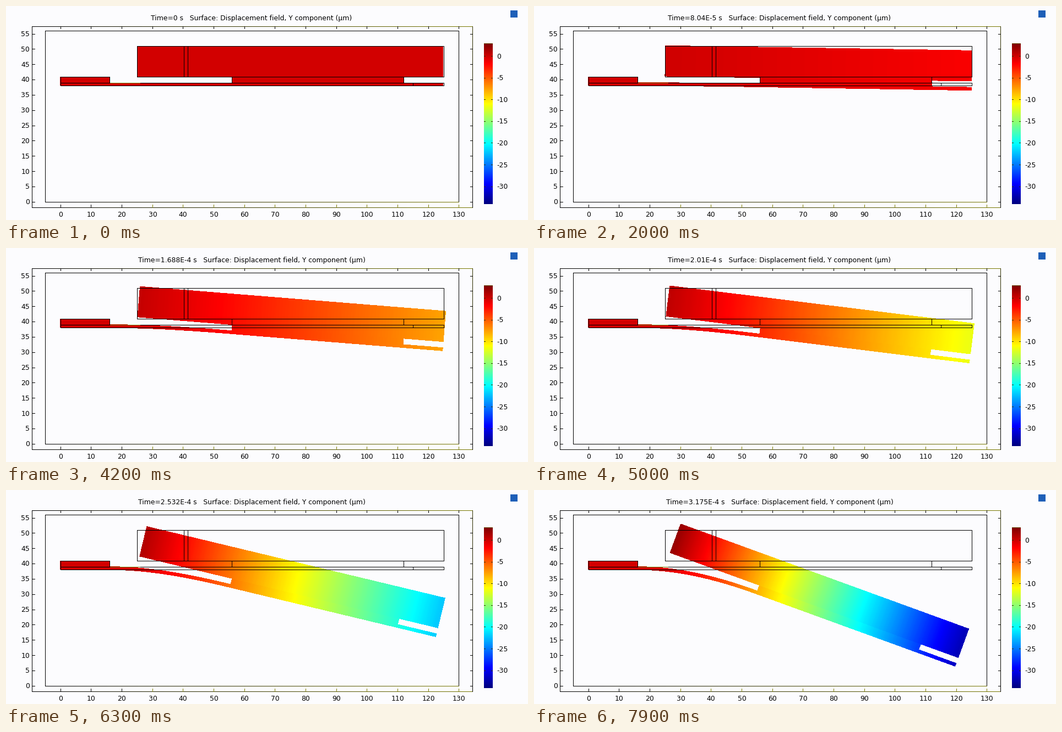
Animation of 948 by 390 pixels, one loop 8 s. Source, as a matplotlib script:

```python
import numpy as np
import matplotlib.pyplot as plt
from matplotlib.animation import FuncAnimation
from matplotlib.collections import LineCollection, PolyCollection
from matplotlib.colors import LinearSegmentedColormap, to_rgb
from matplotlib.patches import Rectangle

W, H, DPI = 948, 390, 100
FRAMES, STEP_MS = 80, 100
PX = 72 / DPI                      # one pixel in points
VMIN, VMAX = -34.0, 2.97           # colour range in µm
CLAMP, POST = 16, 56               # free span of the thin beam
SPAN = POST - CLAMP
BLACK, OLIVE = "#000000", "#7a7a00"

rainbow = LinearSegmentedColormap.from_list("rainbow", [
    (0, "#000080"), (1 / 8, "#0000ff"), (3 / 8, "#00ffff"),
    (5 / 8, "#ffff00"), (7 / 8, "#ff0000"), (1, "#800000")], N=512)

plt.rcParams["font.family"] = "DejaVu Sans"
plt.rcParams["font.size"] = 12.34 * PX

fig = plt.figure(figsize=(W / DPI, H / DPI), dpi=DPI, facecolor="#fcfcfe")
ax = fig.add_axes([0, 0, 1, 1])


def sx(x):
    return 98.5 + 5.568 * np.asarray(x, float)


def sy(y):
    return 356.9 - 5.57 * np.asarray(y, float)


def bar_y(v):
    return 91.0 - 7.917 * v


def snap(v):
    """Centre of the pixel nearest to v."""
    return np.floor(v + 0.5) + 0.5


def line(x0, y0, x1, y1, c0=BLACK, c1=None):
    """One-pixel line in stage pixels, optionally fading between two colours."""
    n = 40 if c1 else 1
    t = np.linspace(0, 1, n + 1)[:, None]
    a, b = np.array([snap(x0), snap(y0)]), np.array([snap(x1), snap(y1)])
    pts = a + (b - a) * t
    ca, cb = np.array(to_rgb(c0)), np.array(to_rgb(c1 or c0))
    ax.add_collection(LineCollection(
        np.stack([pts[:-1], pts[1:]], axis=1), colors=ca + (cb - ca) * t[:-1],
        linewidths=PX, capstyle="projecting", snap=False, zorder=5),
        autolim=False)


def edge(x0, y0, x1, y1, c0=BLACK, c1=None):
    """Line in model units."""
    line(sx(x0), sy(y0), sx(x1), sy(y1), c0, c1)


def box(x0, y0, x1, y1):
    for seg in ((x0, y0, x1, y0), (x1, y0, x1, y1),
                (x1, y1, x0, y1), (x0, y1, x0, y0)):
        edge(*seg)


# ---- static plot furniture ----
def draw_axes():
    l, t, r, b = 47, 37, 847, 367
    line(l, t, r, t, BLACK, OLIVE)
    line(l, b, r, b, BLACK, OLIVE)
    line(l, t, l, b)
    line(r, t, r, b, "#303000", BLACK)
    for v in range(0, 131, 10):
        x = sx(v)
        line(x, t, x, t + 4)
        line(x, b - 5, x, b, BLACK if v < 30 else OLIVE)
        ax.text(snap(x), 384, str(v), ha="center", va="baseline")
    for v in range(0, 56, 5):
        y = sy(v)
        line(l, y, l + 5, y)
        line(r - 4, y, r, y)
        ax.text(43, y + 4.4, str(v), ha="right", va="baseline")


def draw_bar():
    ramp = np.linspace(1, 0, 293)[:, None]
    ax.imshow(ramp, cmap=rainbow, vmin=0, vmax=1, aspect="auto",
              extent=(868, 884, 361, 68), zorder=2)
    line(868, 68, 883, 68, "#604000")
    for v in range(0, -31, -5):
        y = bar_y(v)
        line(868, y, 870, y, "#303000")
        line(881, y, 883, y, "#303000")
        ax.text(891, y + 4.7, str(v), ha="left", va="baseline")


def draw_outline():
    box(-5, 0, 130, 56)
    edge(-5, 0, 130, 0, BLACK, OLIVE)
    box(0, 38, 125, 39)
    box(0, 39, 16, 41)
    box(25, 41, 125, 51)
    for x, y0, y1 in ((40.3, 41, 51), (41.5, 41, 51),
                      (56, 39, 41), (112, 39, 41), (115, 38, 39)):
        edge(x, y0, x, y1)
    edge(16.2, 39, 26, 39, OLIVE)


# ---- deforming body ----
def strip(x0, x1, y0, y1, dx=0.5):
    """Columns of quads; each overlaps the next a little to hide seams."""
    a = np.arange(x0, x1, dx)
    b = np.minimum(a + dx + 0.25, x1)
    lo, hi = np.full_like(a, y0), np.full_like(a, y1)
    return np.stack([np.stack([a, b, b, a], 1), np.stack([lo, lo, hi, hi], 1)], 2)


beam = strip(0.0, 125, 38, 39)
block = np.concatenate([strip(0.0, 16, 38.8, 41), strip(56.0, 112, 38.8, 41.2),
                        strip(25.0, 125, 41, 51)])
n_fixed = 32                       # leading quads of block: the anchor

KEY = np.array([0, 20, 33, 50, 63, 72, 79])
ANGLE = np.array([0, 0.93, 2.63, 7.08, 13.53, 15.1, 20.06])
SLOPE = np.array([0, 0.093, 0.19, 0.36, 0.42, 0.38, 0.85])


def tilt(n):
    """Plate angle in radians, cubic Hermite between the keys."""
    i = min(np.searchsorted(KEY, n, side="right") - 1, len(KEY) - 2)
    h = KEY[i + 1] - KEY[i]
    t = (n - KEY[i]) / h
    deg = ((1 + 2 * t) * (1 - t) ** 2 * ANGLE[i] + t * (1 - t) ** 2 * h * SLOPE[i]
           + t * t * (3 - 2 * t) * ANGLE[i + 1] + t * t * (t - 1) * h * SLOPE[i + 1])
    return np.radians(deg)


def deform(n):
    th = tilt(n)
    a = 6 * np.interp(n, [0, 72, 79], [0.617, 0.617, 0.573]) - 2
    s = np.linspace(0, 1, 81)
    phi = th * (a * s + (1 - a) * s * s)

    def integrate(f):
        return np.append(0, np.cumsum((f[1:] + f[:-1]) / 2)) * SPAN / 80

    cx, cy = CLAMP + integrate(np.cos(phi)), 38.5 - integrate(np.sin(phi))

    def rigid(p):
        dx, dy = p[..., 0] - POST, p[..., 1] - 38.5
        return np.stack([cx[-1] + dx * np.cos(th) + dy * np.sin(th),
                         cy[-1] - dx * np.sin(th) + dy * np.cos(th)], -1)

    def bent(p):
        x, dy = p[..., 0], p[..., 1] - 38.5
        u = (x - CLAMP) / SPAN
        ang = np.interp(u, s, phi)
        mid = np.stack([np.interp(u, s, cx) + dy * np.sin(ang),
                        np.interp(u, s, cy) + dy * np.cos(ang)], -1)
        out = np.where((x > POST)[..., None], rigid(p), mid)
        return np.where((x < CLAMP)[..., None], p, out)

    before = np.concatenate([beam, block])
    after = np.concatenate([bent(beam), block[:n_fixed], rigid(block[n_fixed:])])
    lift = (after - before)[..., 1].mean(axis=1)
    return np.stack([sx(after[..., 0]), sy(after[..., 1])], -1), lift


def title_text(n):
    """Time stamp with the mantissa cut to three decimals."""
    digits = str(402 * n)
    if n == 0:
        t = "0"
    else:
        frac = digits[1:4].rstrip("0")
        t = digits[0] + ("." + frac if frac else "") + f"E{len(digits) - 9}"
    return f"Time={t} s   Surface: Displacement field, Y component (µm)"


draw_axes()
draw_bar()
draw_outline()
ax.add_patch(Rectangle((916, 8), 13, 13, color="#1d5fb8", lw=0))
title = ax.text(446, 26, "", ha="center", va="baseline")
body = PolyCollection([], cmap=rainbow, edgecolors="none", linewidths=0,
                      antialiaseds=False, zorder=3)
body.set_clim(VMIN, VMAX)
ax.add_collection(body, autolim=False)
ax.set_xlim(0, W)
ax.set_ylim(H, 0)
ax.axis("off")


def update(n):
    verts, lift = deform(n)
    body.set_verts(verts)
    body.set_array(lift)
    title.set_text(title_text(n))
    return body, title


anim = FuncAnimation(fig, update, frames=FRAMES, interval=STEP_MS,
                     init_func=lambda: update(0), repeat=True, repeat_delay=0)
plt.show()
```
